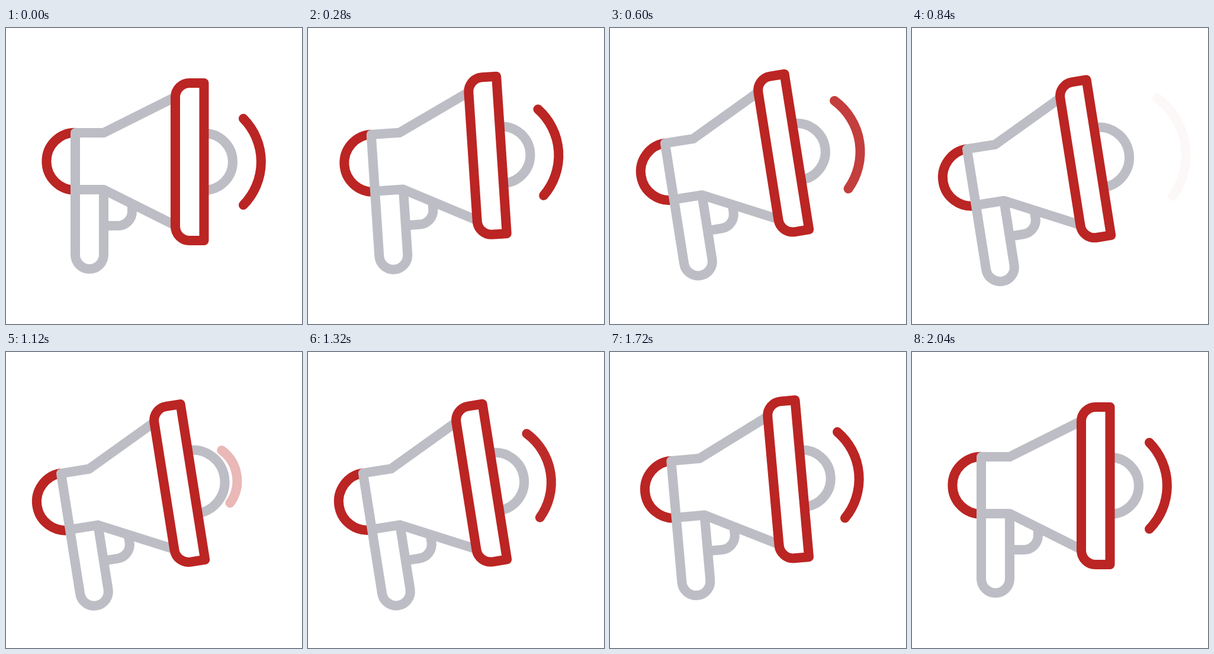
These frames come from a looping animation (500 px wide and 500 px high, 2.16 s). An HTML page:

```html
<!DOCTYPE html>
<html lang="en">
<head>
<meta charset="utf-8">
<title>Megaphone</title>
<style>
  html, body { margin: 0; width: 100%; height: 100%; overflow: hidden; background: #fff; }
  svg { display: block; width: 100vw; height: 100vh; }
  path { fill: none; stroke-width: 16; stroke-linecap: round; stroke-linejoin: round; }
  .red { stroke: #bb2523; }
  .grey { stroke: #bdbdc5; }
  .flat { stroke-linecap: butt; }
</style>
</head>
<body>
<svg viewBox="0 0 500 500">
  <g id="horn">
    <path class="red flat" d="M117 176.7A48.6 48.6 0 0 0 117 273.9"/>
    <path id="dome" class="grey flat"/>
    <path class="grey" d="M213 302V310A24 24 0 0 1 189 334H165"/>
    <path class="grey" d="M286 116.5L165 177H117V383A24 24 0 0 0 165 383V273L286 333.5M117 273H165"/>
    <path class="red" d="M334.5 93H310A24 24 0 0 0 286 117V335A24 24 0 0 0 310 359H334.5Z"/>
    <path id="wave" class="red"/>
  </g>
</svg>
<script>
const LOOP = 2160, STEP = 40;
const PIVOT = { x: 156, y: 334 }, AXIS_Y = 226;
const TILT = 9, DROP = 20;
const [horn, dome, wave] = ['horn', 'dome', 'wave'].map(id => document.getElementById(id));

// Smooth 0..1 between two times
function ease(t, start, end) {
  const p = Math.min(1, Math.max(0, (t - start) / (end - start)));
  return (1 - Math.cos(Math.PI * p)) / 2;
}

// Arc bulging right, symmetric about the horn's axis
function arc(x, half, radius) {
  return `M${x} ${AXIS_Y - half}A${radius} ${radius} 0 0 1 ${x} ${AXIS_Y + half}`;
}

function drawWave(t) {
  const leave = ease(t, 480, 880), enter = ease(t, 965, 1365);
  const leaving = t < 920;
  const x = leaving ? 401 + 48 * leave : 386.5 + 14.5 * enter;
  const scale = leaving ? 1 + 0.15 * leave : 0.43 + 0.57 * enter;
  wave.setAttribute('d', arc(x, 73 * scale, 104 * scale));
  wave.setAttribute('opacity', leaving ? 1 - ease(t, 520, 880) : enter);
}

function draw(t) {
  const angle = TILT * (ease(t, 35, 580) - ease(t, 1460, 2025));
  const drop = DROP * (ease(t, 306, 906) - ease(t, 1272, 1872));
  horn.setAttribute('transform', `translate(0 ${drop}) rotate(${-angle} ${PIVOT.x} ${PIVOT.y})`);

  const pulse = ease(t, 640, 1040) - ease(t, 1040, 1440);
  const radius = 48 * (1 + 0.13 * pulse);
  dome.setAttribute('d', arc(335, radius, radius));
  drawWave(t);
}

function tick() {
  const t = performance.now() % LOOP;
  draw(Math.floor(t / STEP) * STEP);
  requestAnimationFrame(tick);
}
tick();
</script>
</body>
</html>
```
